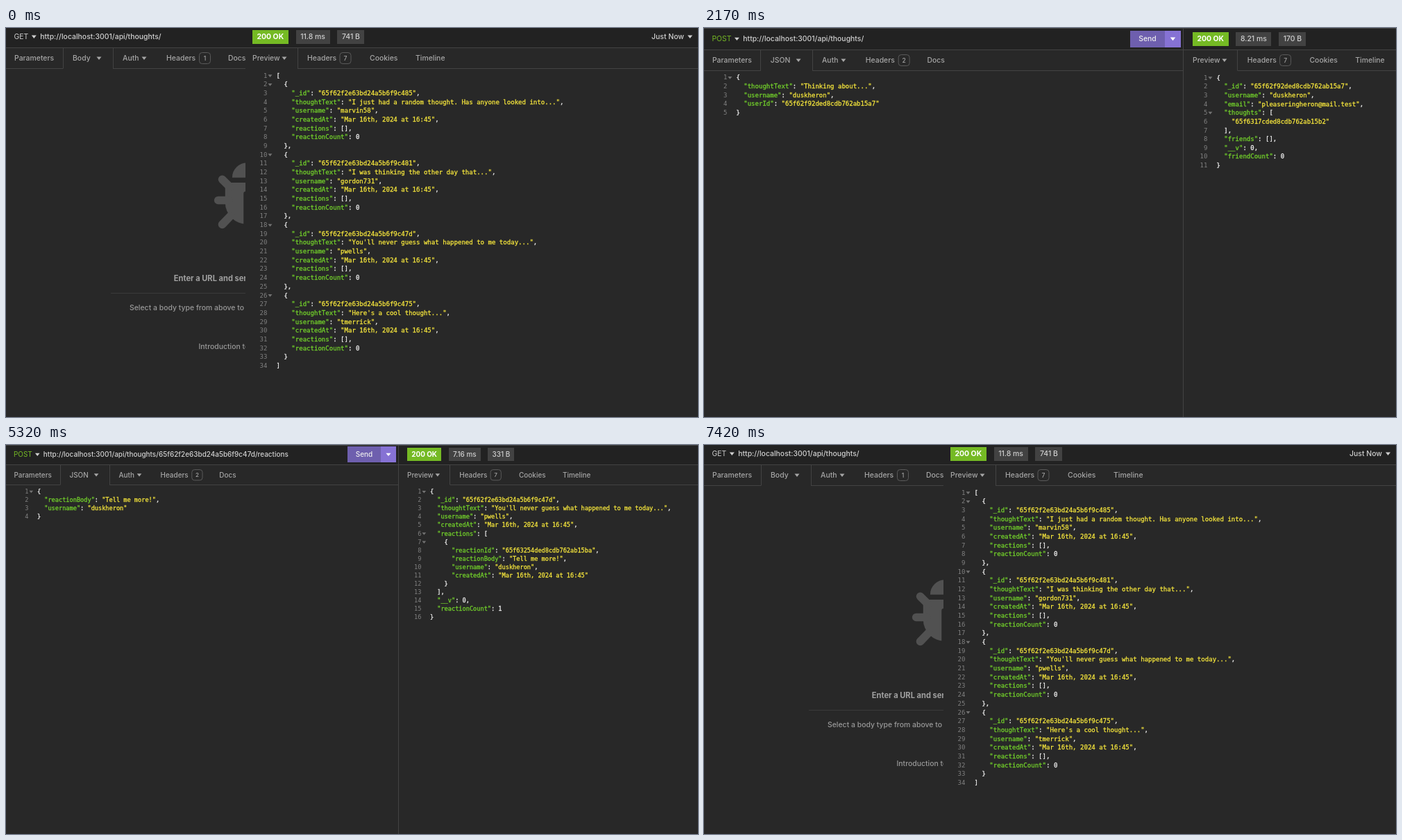
Write an HTML page with a canvas that moves like this. It is 997x561 px and loops after 7490 ms.

```html
<!DOCTYPE html>
<html lang="en">
<head>
<meta charset="utf-8">
<title>API client tour</title>
<style>
html, body { margin: 0; width: 100%; height: 100%; overflow: hidden; background: #282828; }
canvas { display: block; }
</style>
</head>
<body>
<canvas id="stage" width="997" height="561"></canvas>
<script>
const W = 997, H = 561, LOOP = 7490;
const ctx = document.getElementById('stage').getContext('2d');
const UI = 'Inter, "Open Sans", sans-serif';
const MONO = '"DejaVu Sans Mono", "Liberation Mono", monospace';
const C = {
  bg: '#282828', bar: '#222', line: '#434343', rule: '#3a3a3a', text: '#a6a6a6', bright: '#d0d0d0',
  green: '#75ba24', key: '#72d02b', yellow: '#f5e53c', white: '#f0f0f0', dim: '#808080', bug: '#515151'
};
const METHOD = { GET: '#ccc', POST: C.green, PUT: '#d07502', DELETE: '#cf5350' };

const API = 'http://localhost:3001/api/thoughts/';
const CREATED = 'Mar 16th, 2024 at 16:45';
const thought = (id, thoughtText, username) => ({
  _id: '65f62f2e63bd24a5b6f9c4' + id, thoughtText, username,
  createdAt: CREATED, reactions: [], reactionCount: 0
});
const guess = thought('7d', "You'll never guess what happened to me today...", 'pwells');
const cool = thought('75', "Here's a cool thought...", 'tmerrick');
const newId = '65f6317cded8cdb762ab15b2', userId = '65f62f92ded8cdb762ab15a7';
const reactionId = '65f63254ded8cdb762ab15ba', username = 'duskheron';
const user = thoughts => ({
  _id: userId, username, email: 'pleaseringheron@mail.test',
  thoughts, friends: [], __v: 0, friendCount: 0
});
const withVersion = ({ reactionCount, ...rest }, reactions) =>
  ({ ...rest, reactions, __v: 0, reactionCount: reactions.length });

// k: zoom, ox: left offset, oy: line under the tabs, pane: response edge, rx: response text
const scenes = [
  { k: 1, ox: 0, oy: 58.5, pane: 345, rx: 355, cx: 347, method: 'GET', url: API,
    time: '11.8 ms', size: '741 B', badge: 1, cropped: true,
    reply: [
      thought('85', 'I just had a random thought. Has anyone looked into...', 'marvin58'),
      thought('81', 'I was thinking the other day that...', 'gordon731'), guess, cool] },
  { k: .945, ox: -1.2, oy: 59.5, pane: 654.5, rx: 667, cx: 326.5, method: 'GET', url: API + cool._id,
    time: '5.27 ms', size: '168 B', badge: 1, send: '#8672d4', filter: 535.5, reply: cool },
  { k: .997, ox: 0, oy: 61.5, pane: 690.5, rx: 704, method: 'POST', url: API,
    time: '8.21 ms', size: '170 B', badge: 2, send: '#6e5fae',
    body: { thoughtText: 'Thinking about...', username, userId }, reply: user([newId]) },
  { k: .997, ox: 0, oy: 61.5, pane: 690.5, rx: 704, method: 'PUT', url: API + newId,
    time: '6.42 ms', size: '176 B', badge: 2, send: '#6e5fae',
    body: { thoughtText: 'Thinking again...' },
    reply: { _id: newId, thoughtText: 'Thinking again...', username,
      createdAt: CREATED, reactions: [], __v: 0, reactionCount: 0 } },
  { k: .953, ox: 1.5, oy: 56.5, pane: 664.5, rx: 677, cx: 332.3, method: 'DELETE', url: API + newId,
    time: '5.78 ms', size: '144 B', badge: 1, send: '#6e5fae', filter: 539.5, reply: user([]) },
  { k: .953, ox: 0, oy: 57.5, pane: 565.5, rx: 578, method: 'POST', url: API + guess._id + '/reactions',
    time: '7.16 ms', size: '331 B', badge: 2, send: '#6e5fae',
    body: { reactionBody: 'Tell me more!', username },
    reply: withVersion(guess, [{ reactionId, reactionBody: 'Tell me more!', username, createdAt: CREATED }]) },
  { k: .953, ox: -.7, oy: 57.5, pane: 565.5, rx: 578, cx: 329.5, method: 'DELETE',
    url: API + guess._id + '/reactions/' + reactionId,
    time: '4.33 ms', size: '197 B', badge: 1, filter: 538.5, topLine: '#c4c4c4', reply: withVersion(guess, []) }
];

function rect(x, y, w, h, color) {
  ctx.fillStyle = color;
  ctx.fillRect(x, y, w, h);
}
const hLine = (x1, x2, y, color = C.line) => rect(x1, Math.floor(y), x2 - x1, 1, color);
const vLine = (x, y1, y2) => rect(Math.floor(x), y1, 1, y2 - y1, C.line);

// y is the middle of the capitals; returns the text width
function text(str, x, y, size, color, { weight = 500, font = UI, align = 'left', bolder = 0 } = {}) {
  ctx.font = `${weight} ${size}px ${font}`;
  ctx.textAlign = align;
  ctx.fillStyle = ctx.strokeStyle = color;
  ctx.fillText(str, x, y + size * .36);
  if (bolder) {
    ctx.lineWidth = bolder;
    ctx.strokeText(str, x, y + size * .36);
  }
  return ctx.measureText(str).width;
}

function caret(x, y, w, color) {
  ctx.fillStyle = color;
  ctx.beginPath();
  ctx.moveTo(x - w / 2, y - w * .28);
  ctx.lineTo(x + w / 2, y - w * .28);
  ctx.lineTo(x, y + w * .34);
  ctx.fill();
}

function badge(n, x, y, k) {
  ctx.strokeStyle = '#5a5a5a';
  ctx.lineWidth = 1;
  ctx.beginPath();
  ctx.roundRect(x - 8 * k, y - 8 * k, 16 * k, 16 * k, 4 * k);
  ctx.stroke();
  text(n, x, y, 8.6 * k, C.text, { align: 'center' });
}

function code(data, x, y, k) {
  const size = 9.05 * k, plain = { font: MONO, weight: 400 };
  JSON.stringify(data, null, 2).split('\n').forEach((line, i) => {
    const cy = y + i * 12.67 * k;
    text(i + 1, x + 21.5 * k, cy, size, C.dim, { ...plain, align: 'right' });
    if (/[{[]$/.test(line)) caret(x + 25.5 * k, cy + .5, 6 * k, '#737373');
    let cx = x + 34.5 * k;
    for (const part of line.match(/"[^"]*"|[^"]+/g)) {
      const isKey = part[0] === '"' && line.includes(part + ':');
      const color = isKey ? C.key : part[0] === '"' ? C.yellow : C.white;
      cx += text(part, cx, cy, size, color, { ...plain, bolder: .3 });
    }
  });
}

function bug(cx, top, s) {
  ctx.save();
  ctx.translate(cx, top);
  ctx.scale(s, s);
  ctx.fillStyle = ctx.strokeStyle = C.bug;
  ctx.beginPath();
  ctx.arc(0, 20, 20, Math.PI, 0);
  ctx.fill();
  ctx.beginPath();
  ctx.moveTo(-29.5, 27);
  ctx.lineTo(29.5, 27);
  ctx.lineTo(29.5, 54);
  ctx.arc(0, 54, 29.5, 0, Math.PI);
  ctx.fill();
  ctx.lineWidth = 11;
  ctx.lineCap = 'round';
  ctx.beginPath();
  for (const side of [-1, 1]) {
    for (const [x1, y1, x2, y2] of [[23, 33, 33.5, 22.5], [25, 51, 39, 51], [22, 72, 33.5, 84]]) {
      ctx.moveTo(side * x1, y1);
      ctx.lineTo(side * x2, y2);
    }
  }
  ctx.stroke();
  ctx.fillStyle = C.bg;
  ctx.beginPath();
  ctx.roundRect(-4.5, 39, 9, 46, [3, 3, 0, 0]);
  ctx.fill();
  ctx.restore();
}

function emptyBody({ k, oy, cx }) {
  const size = 10.45 * k, at = v => oy + v * k;
  bug(cx, at(136), k / .945);
  text('Enter a URL and send to get a response', cx, at(302.5), 11.1 * k, '#a0a0a0', { weight: 700, align: 'center' });
  hLine(cx - 196 * k, cx + 196 * k, at(324), C.rule);
  text('Select a body type from above to send data in the body of a request', cx, at(345), size, '#999', { align: 'center' });
  const y = at(400.5), x = cx - 69.5 * k;
  const end = x + text('Introduction to Velmonia', x, y, size, '#999');
  ctx.save();
  ctx.translate(end + 6.5 * k, y - 5.5 * k);
  ctx.scale(k, k);
  ctx.strokeStyle = '#999';
  ctx.lineWidth = 1.2;
  ctx.stroke(new Path2D('M5 2H.7V11H9.7V7M7 .7H11.3V5M11 1L4.5 7.5'));
  ctx.restore();
}

function sendButton(right, cy, k, color) {
  const [left, split, top, bottom] =
    [right - 73.5 * k, right - 23 * k, cy - 12 * k, cy + 12 * k].map(Math.round);
  rect(left, top, split - left, bottom - top, color);
  rect(split, top, right - split, bottom - top, '#8672d4');
  text('Send', (left + split) / 2, cy, 10.45 * k, '#eee', { align: 'center' });
  caret((split + right) / 2, cy, 7.5 * k, '#fff');
}

function request(s) {
  const { k, ox, oy, pane } = s, size = 10.45 * k;
  const X = u => ox + u * k, barY = oy - 46 * k, tabY = oy - 15 * k;
  const shift = s.body ? 2.5 : 0;
  let x = X(11.5);
  x += text(s.method, x, barY, size, METHOD[s.method], { weight: 400 }) + 8 * k;
  caret(x, barY, 7 * k, C.bright);
  text(s.url, x + 9 * k, barY, size, C.bright);
  if (s.send) sendButton(Math.floor(pane) - 3, barY, k, s.send);
  text('Parameters', X(12), tabY, size, C.text);
  text(s.body ? 'JSON' : 'Body', X(96), tabY, size, C.text);
  caret(X(134 + shift), tabY, 7 * k, C.text);
  text('Auth', X(168 + shift), tabY, size, C.text);
  caret(X(199 + shift), tabY, 7 * k, C.text);
  text('Headers', X(231 + shift), tabY, size, C.text);
  badge(s.badge, X(286.5 + shift), tabY, k);
  text('Docs', X(320 + shift), tabY, size, C.text);
  const left = X(82), right = X(154 + shift);
  vLine(left, oy - 30 * k, oy);
  vLine(right, oy - 30 * k, oy);
  hLine(0, left, oy);
  hLine(right, pane, oy);
  if (s.body) code(s.body, 12, oy + 9.7 * k, k);
  else emptyBody(s);
}

function pill(label, x, cy, k, fill, ink, weight) {
  const size = 10.45 * k;
  ctx.font = `${weight} ${size}px ${UI}`;
  const w = ctx.measureText(label).width + 13 * k;
  rect(Math.round(x), Math.round(cy - 10 * k), Math.round(w), Math.round(20 * k), fill);
  text(label, x + 6.5 * k, cy, size, ink, { weight });
  return w;
}

function response(s) {
  const { k, oy, pane, rx } = s, size = 10.45 * k;
  const X = u => rx + u * k, barY = oy - 46 * k, tabY = oy - 15 * k;
  let x = rx;
  x += pill('200 OK', x, barY, k, C.green, '#fff', 700) + 11 * k;
  x += pill(s.time, x, barY, k, '#424242', C.bright, 500) + 11 * k;
  pill(s.size, x, barY, k, '#424242', C.bright, 500);
  if (s.cropped) {
    text('Just Now', 977, barY, size, C.bright, { align: 'right' });
    caret(985.5, barY, 7, C.bright);
  }
  text('Preview', rx, tabY, size, C.text);
  caret(X(46), tabY, 7 * k, C.text);
  text('Headers', X(79), tabY, size, C.text);
  badge(7, X(134), tabY, k);
  text('Cookies', X(169), tabY, size, C.text);
  text('Timeline', X(235), tabY, size, C.text);
  vLine(X(65), oy - 30 * k, oy);
  hLine(X(65), W, oy);
  code(s.reply, rx, oy + 10 * k, k);
  if (s.filter) {
    hLine(pane, W, s.filter);
    text('$.store.books[∗].author', rx, s.filter + 12, 9.85 * k, '#a6a6a6', { font: MONO, weight: 400, bolder: .3 });
  }
  if (!s.cropped) vLine(pane, 0, H);
}

function pane(x, w, draw, s) {
  const barH = Math.floor(s.oy - 30 * s.k);
  ctx.save();
  ctx.beginPath();
  ctx.rect(x, 0, w, H);
  ctx.clip();
  rect(x, 0, w, H, C.bg);
  rect(x, 0, w, barH, C.bar);
  hLine(x, x + w, barH);
  draw(s);
  ctx.restore();
}

function frame(now) {
  const t = now % LOOP;
  const s = scenes[Math.max(0, Math.floor((t - 70) / 1050)) % scenes.length];
  const split = Math.floor(s.pane);
  pane(0, split, request, s);
  pane(split, W - split, response, s);
  if (!s.cropped) rect(0, 0, W, 1, s.topLine || C.line);
  requestAnimationFrame(frame);
}
requestAnimationFrame(frame);
</script>
</body>
</html>
```
